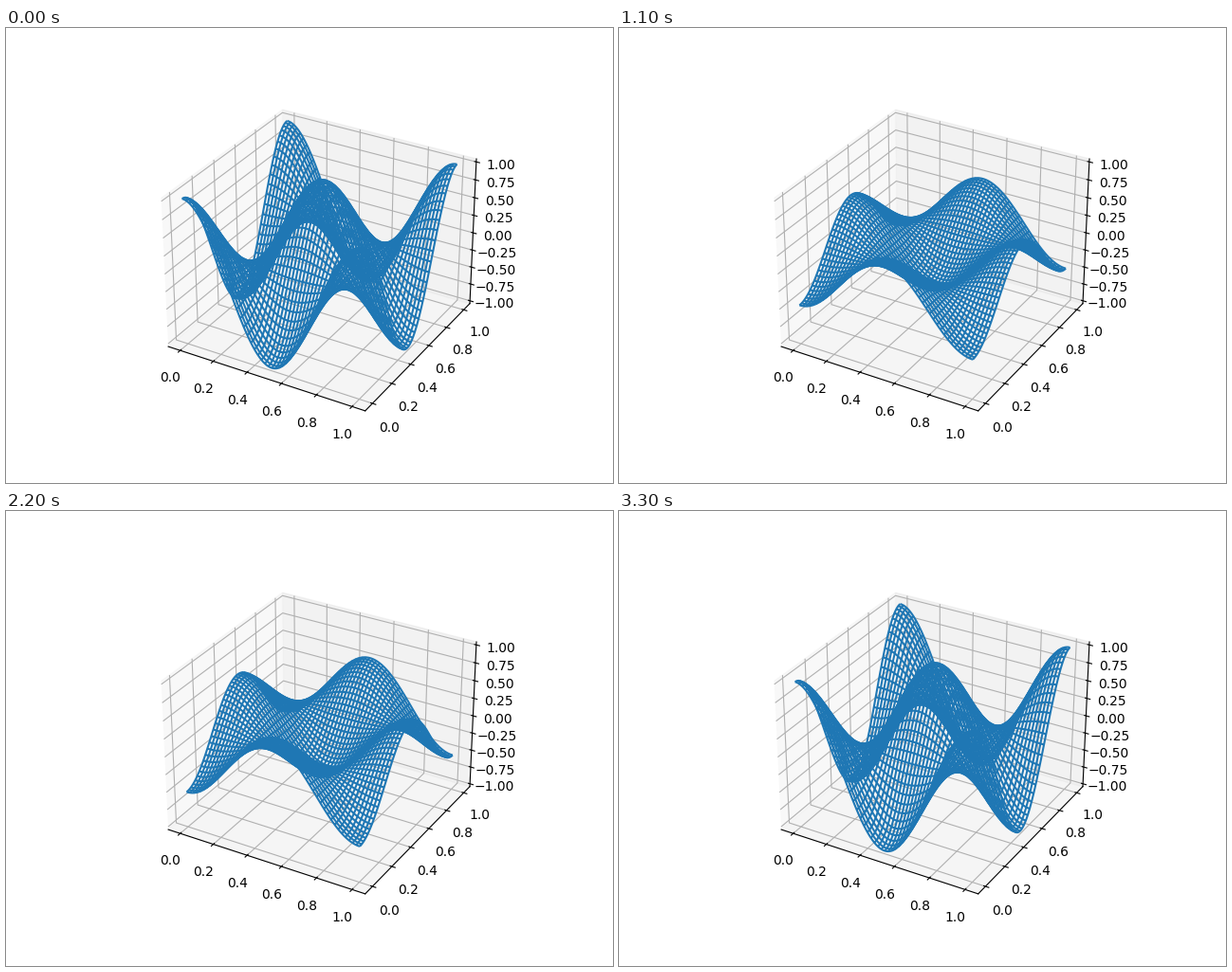
A matplotlib script that plays this animation: 640 px wide and 480 px high, repeating every 3.4 s.

```python
import numpy as np
import matplotlib.pyplot as plt
from matplotlib.animation import FuncAnimation

FRAMES = 34
INTERVAL = 100   # ms
FREQ = 0.3       # oscillations per second


def padded(lo, hi, frac):
    """Widen a range on both sides by a fraction of its length."""
    pad = (hi - lo) * frac
    return lo - pad, hi + pad


fig = plt.figure(figsize=(6.4, 4.8), dpi=100)
ax = fig.add_subplot(projection="3d")

xy_lim = padded(*padded(0, 1, 0.05), 1 / 48)
ax.set_xlim(*xy_lim)
ax.set_ylim(*xy_lim)
ax.set_zlim(*padded(-1, 1, 1 / 48))

s = np.linspace(0, 1, 101)
X, Y = np.meshgrid(s, s, indexing="ij")
mode = np.cos(2 * np.pi * X) * np.cos(2 * np.pi * Y)

wire = None


def update(i):
    """Draw the standing wave at its amplitude for step i."""
    global wire
    if wire is not None:
        wire.remove()
    t = i * INTERVAL / 1000
    Z = mode * np.cos(2 * np.pi * FREQ * t)
    wire = ax.plot_wireframe(X, Y, Z, rstride=2, cstride=2, color="C0")
    return (wire,)


anim = FuncAnimation(fig, update, frames=FRAMES, interval=INTERVAL,
                     init_func=lambda: (), repeat=True, repeat_delay=0,
                     blit=False)
plt.show()
```
